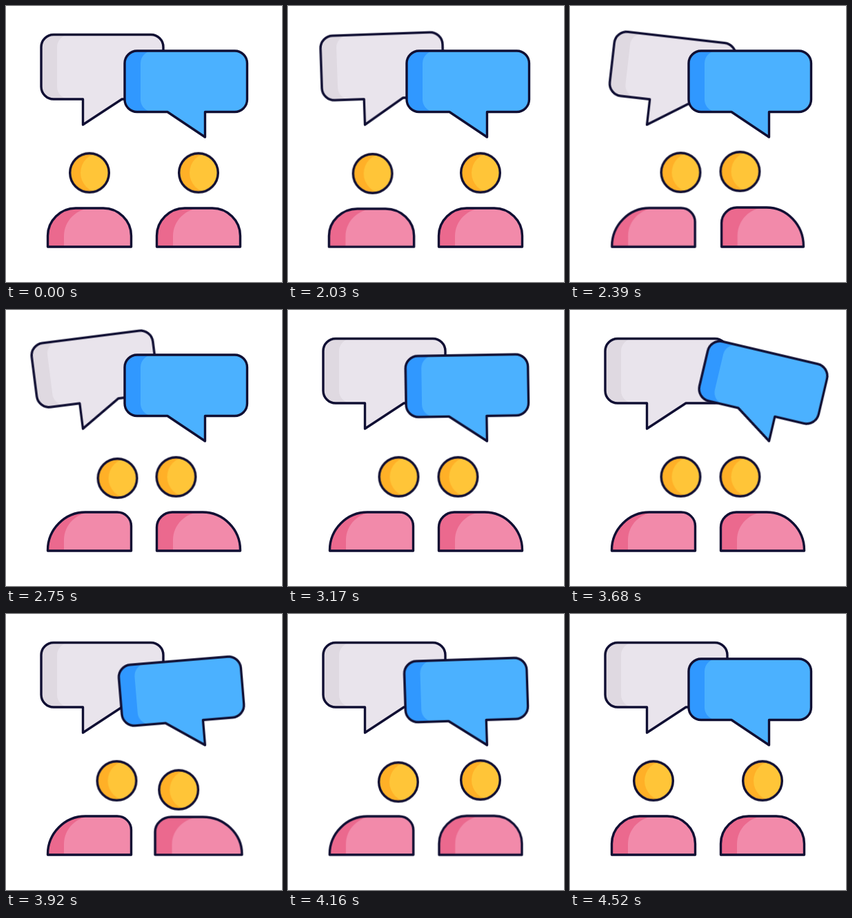
An HTML page without scripts that plays this animation: 400x400 px, repeating every 4.55 s.

```html
<!DOCTYPE html>
<html lang="en">
<head>
<meta charset="utf-8">
<title>Conversation</title>
<style>
  html, body { margin: 0; width: 100%; height: 100%; overflow: hidden; background: #fff; }
  svg { display: block; width: 100vw; height: 100vh; }

  .line { fill: none; stroke: #100f33; stroke-width: 3.4; stroke-linejoin: round; stroke-linecap: round; }
  .bubble, .head, .squash, .torso {
    animation: 4550ms cubic-bezier(.37, 0, .63, 1) infinite;
  }
  .head { animation-timing-function: linear; }

  .bubble.left { transform-origin: 111.5px 172px; animation-name: swing-left; }
  .bubble.right { transform-origin: 288.5px 190px; animation-name: swing-right; }
  .left .head { animation-name: head-left; }
  .right .head { animation-name: head-right; }
  .left .squash { animation-name: squash-left; }
  .right .squash { animation-name: squash-right; }
  .torso { d: path("M-60.5 0V-16C-60.5 -38 -42 -56 -20 -56H20C42 -56 60.5 -38 60.5 -16V0Z"); }
  .torso.l { animation-name: lean-left; }
  .torso.r { animation-name: lean-right; }

  @keyframes swing-left {
    0%, 43.96% { transform: rotate(0deg); }
    47.25% { transform: rotate(-20deg); }
    54.95% { transform: rotate(14deg); }
    61.54% { transform: rotate(-8.7deg); }
    66.59% { transform: rotate(2.5deg); }
    69.67%, 100% { transform: rotate(0deg); }
  }
  @keyframes swing-right {
    0%, 69.23% { transform: rotate(0deg); }
    72.53% { transform: rotate(-20deg); }
    79.89% { transform: rotate(14deg); }
    88.57% { transform: rotate(-8.7deg); }
    93.63% { transform: rotate(2.5deg); }
    96.7%, 100% { transform: rotate(0deg); }
  }

  @keyframes head-left {
    0%, 43.96% { transform: translate(0, 0); }
    44.62% { transform: translate(1.5px, 1px); }
    46.37% { transform: translate(14px, 12px); }
    48.57% { transform: translate(30px, 9px); }
    50.77% { transform: translate(39.5px, -2.5px); }
    52.53% { transform: translate(39.5px, -.5px); }
    53.4%, 59.34% { transform: translate(39.5px, 0); }
    60.44% { transform: translate(40.5px, 2px); }
    62.86% { transform: translate(43px, 9px); }
    67.69%, 72.31% { transform: translate(39.5px, 0); }
    76.26% { transform: translate(43px, 9px); }
    80.44%, 91.21% { transform: translate(39.5px, 0); }
    92.97% { transform: translate(35px, 13px); }
    94.73% { transform: translate(18px, 12px); }
    96.92% { transform: translate(0, -2.5px); }
    98.68%, 100% { transform: translate(0, 0); }
  }
  @keyframes head-right {
    0%, 45.49% { transform: translate(0, 0); }
    47.25% { transform: translate(-4px, 13px); }
    49.45% { transform: translate(-20px, 12px); }
    52.09% { transform: translate(-32.5px, -2.5px); }
    54.29%, 84.84% { transform: translate(-32.5px, 0); }
    86.15% { transform: translate(-29px, 13px); }
    88.13% { transform: translate(-14px, 13px); }
    90.33% { transform: translate(0, -2.5px); }
    92.31%, 100% { transform: translate(0, 0); }
  }

  @keyframes squash-left {
    0%, 43.96% { transform: scale(1); }
    44.62% { transform: scale(1.018, .985); }
    46.59% { transform: scale(1.09, .9); }
    50.77% { transform: scale(.98, 1.02); }
    53.4%, 91.21% { transform: scale(1); }
    93.19% { transform: scale(1.09, .9); }
    96.92% { transform: scale(.98, 1.02); }
    98.68%, 100% { transform: scale(1); }
  }
  @keyframes squash-right {
    0%, 45.49% { transform: scale(1); }
    47.47% { transform: scale(1.09, .9); }
    52.09% { transform: scale(.98, 1.02); }
    54.29%, 84.84% { transform: scale(1); }
    86.15% { transform: scale(1.04, .98); }
    87.25% { transform: scale(1.07, .92); }
    90.33% { transform: scale(.98, 1.02); }
    92.31%, 100% { transform: scale(1); }
  }

  @keyframes lean-left {
    50.77%, 92.75% { d: path("M-60.5 0V-1C-60.5 -31 -36 -56 -6 -56H40C51.5 -56 60.5 -47 60.5 -36V0Z"); }
    0%, 45.27%, 96.92%, 100% { d: path("M-60.5 0V-16C-60.5 -38 -42 -56 -20 -56H20C42 -56 60.5 -38 60.5 -16V0Z"); }
  }
  @keyframes lean-right {
    52.09%, 86.37% { d: path("M-60.5 0V-34C-60.5 -46 -50.5 -56 -38 -56H6C36 -56 60.5 -31 60.5 -1V0Z"); }
    0%, 46.81%, 90.33%, 100% { d: path("M-60.5 0V-16C-60.5 -38 -42 -56 -20 -56H20C42 -56 60.5 -38 60.5 -16V0Z"); }
  }
</style>
</head>
<body>
<svg viewBox="0 0 400 400">
  <defs>
    <path id="grey" d="M69 41.5H210a18 18 0 0 1 18 18V117a18 18 0 0 1-18 18H168L111.5 172V135H69a18 18 0 0 1-18-18V59.5a18 18 0 0 1 18-18Z"/>
    <path id="blue" d="M190 65H331.5a18 18 0 0 1 18 18V135.500a18 18 0 0 1-18 18H288.5V190L234 153.500H190a18 18 0 0 1-18-18V83a18 18 0 0 1 18-18Z"/>
    <path id="chest" d="M-37 0V-16C-37 -38 -18 -56 4 -56H70V0Z"/>
    <clipPath id="disc"><circle r="28.300"/></clipPath>
    <clipPath id="clip-l"><path class="torso l"/></clipPath>
    <clipPath id="clip-r"><path class="torso r"/></clipPath>
    <g id="face">
      <circle r="28.300" fill="#ffb027"/>
      <circle cx="16" r="29" fill="#ffc538" clip-path="url(#disc)"/>
      <circle r="28.300" class="line"/>
    </g>
  </defs>

  <g class="bubble left">
    <use href="#grey" fill="#dfd9e1"/>
    <path fill="#e9e4ec" d="M92 41.5H210a18 18 0 0 1 18 18V117a18 18 0 0 1-18 18H168L111.5 172V135H92a18 18 0 0 1-18-18V59.5a18 18 0 0 1 18-18Z"/>
    <use href="#grey" class="line"/>
  </g>
  <g class="bubble right">
    <use href="#blue" fill="#3098ff"/>
    <path fill="#4bb1ff" d="M213 65H331.5a18 18 0 0 1 18 18V135.5a18 18 0 0 1-18 18H288.5V190L234 153.5H213a18 18 0 0 1-18-18V83a18 18 0 0 1 18-18Z"/>
    <use href="#blue" class="line"/>
  </g>

  <g class="left">
    <g transform="translate(121 349)"><g class="squash">
      <path class="torso l" fill="#eb698e"/>
      <use href="#chest" fill="#f28aaa" clip-path="url(#clip-l)"/>
      <path class="torso l line"/>
    </g></g>
    <g transform="translate(121 241.7)"><g class="head"><use href="#face"/></g></g>
  </g>
  <g class="right">
    <g transform="translate(279 349)"><g class="squash">
      <path class="torso r" fill="#eb698e"/>
      <use href="#chest" fill="#f28aaa" clip-path="url(#clip-r)"/>
      <path class="torso r line"/>
    </g></g>
    <g transform="translate(279 241.7)"><g class="head"><use href="#face"/></g></g>
  </g>
</svg>
</body>
</html>
```
